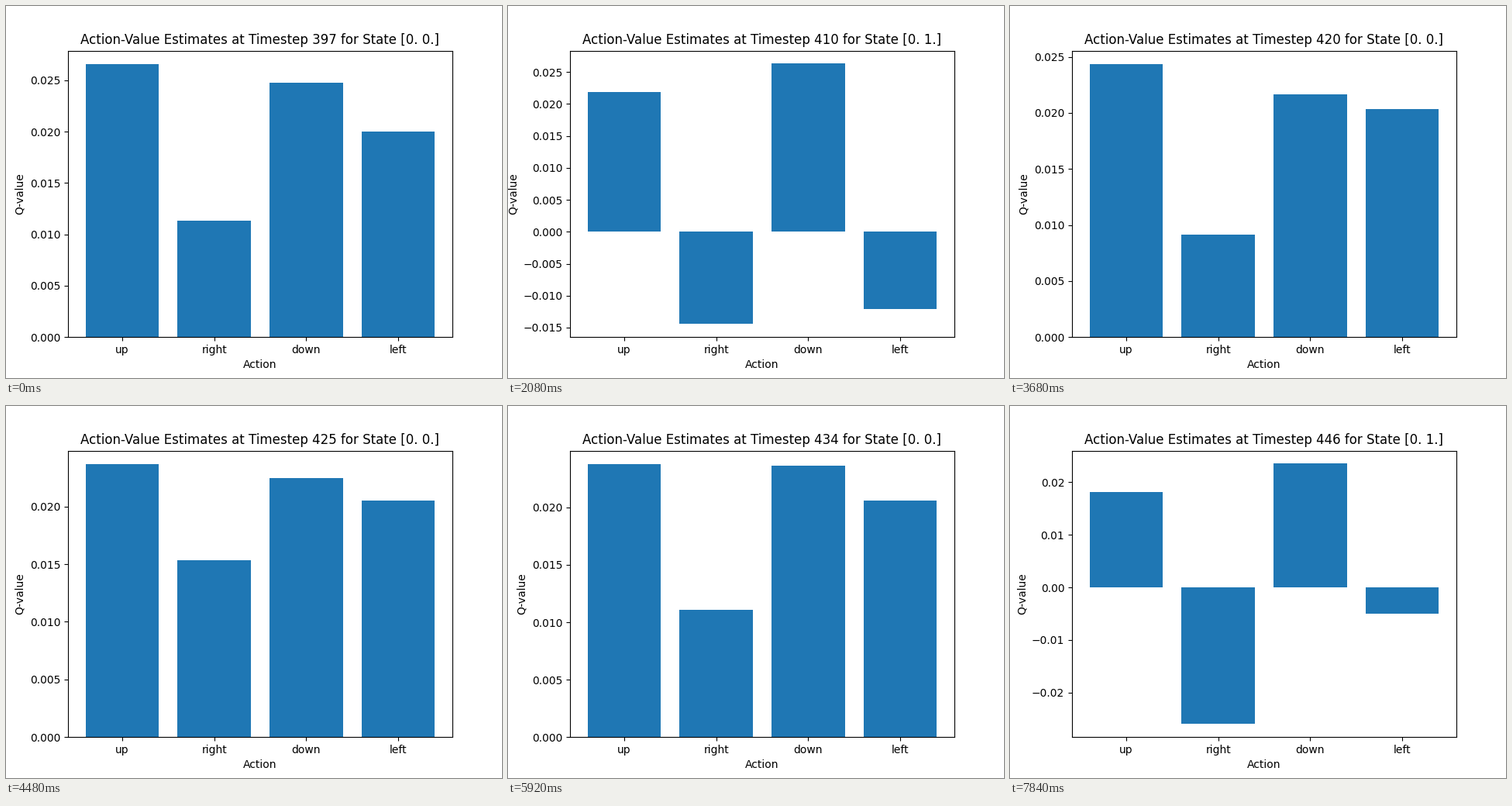
Write a matplotlib script that moves like this. It is 640 px wide and 480 px high and loops after 8000 ms.

```python
import matplotlib.pyplot as plt
import numpy as np
from matplotlib.animation import FuncAnimation

FRAMES = 50
INTERVAL = 160
FIRST_STEP = 397
ACTIONS = ["up", "right", "down", "left"]

# Key estimates (up, right, down, left) of each state, by step offset
CORNER = {
    0: (0.02657, 0.01134, 0.02477, 0.02002),
    23: (0.02433, 0.00914, 0.02165, 0.02033),
    32: (0.02314, 0.02026, 0.02309, 0.02072),
    42: (0.02437, 0.00195, 0.02420, 0.02053),
}
EDGE = {
    8: (0.02191, -0.01945, 0.02650, -0.01242),
    17: (0.02188, -0.00179, 0.02614, -0.01192),
    49: (0.01816, -0.02598, 0.02354, -0.00496),
}


def on_edge(k):
    return 8 <= k < 22 or 33 <= k < 35 or k >= 43


def glide(keys, k):
    return [np.interp(k, list(keys), column) for column in zip(*keys.values())]


def swing(k):
    """Fading oscillation of the edge state's estimate for moving right."""
    return 0.016 * (49 - k) / 41 * np.sin(2 * np.pi * (k - 8) / 9)


fig, ax = plt.subplots(figsize=(6.4, 4.8), dpi=100)


def draw(k):
    edge = on_edge(k)
    values = glide(EDGE if edge else CORNER, k)
    if edge:
        values[1] += swing(k)
    state = np.array([0.0, float(edge)])
    ax.clear()
    ax.bar(ACTIONS, values)
    ax.set_xlabel("Action")
    ax.set_ylabel("Q-value")
    ax.set_title(f"Action-Value Estimates at Timestep {FIRST_STEP + k} for State {state}")


anim = FuncAnimation(fig, draw, frames=FRAMES, init_func=lambda: None,
                     interval=INTERVAL, repeat=True, repeat_delay=0)
plt.show()
```
